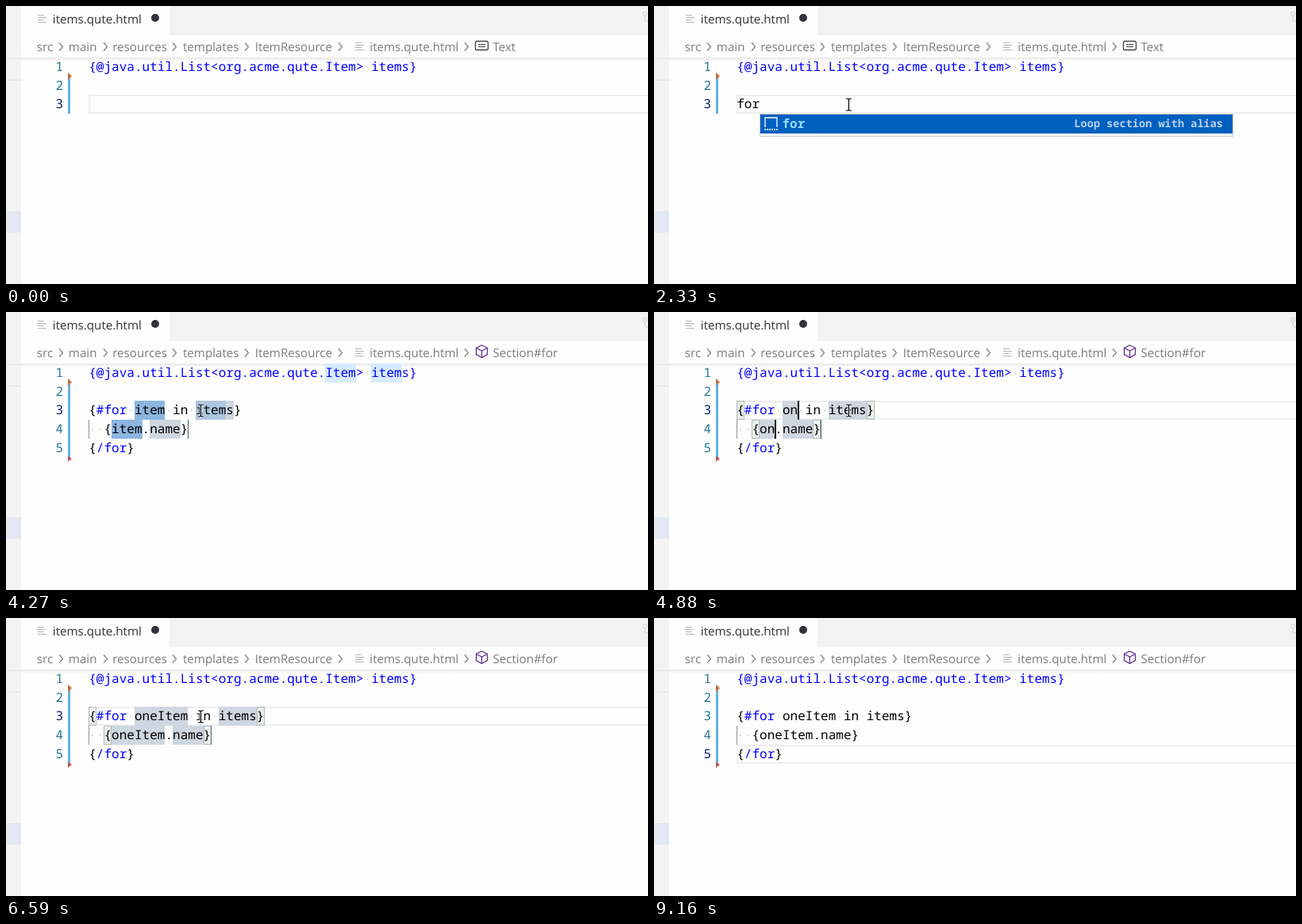
Animation of 809 by 351 pixels, one loop 9240 ms. Source, as an HTML page with a canvas:

```html
<!DOCTYPE html>
<html lang="en">
<head>
<meta charset="utf-8">
<title>Template editor</title>
<style>
  html, body { margin: 0; width: 100%; height: 100%; overflow: hidden; background: #fefefe; }
  canvas { display: block; width: 809px; height: 351px; }
</style>
</head>
<body>
<canvas id="stage" width="809" height="351"></canvas>
<script>
const ctx = document.getElementById('stage').getContext('2d');
const LOOP = 9240, W = 809, H = 351;
const MONO = '"Noto Sans Mono", "DejaVu Sans Mono", monospace';
const SANS = '"Open Sans", "Noto Sans", sans-serif';
const CODE_FONT = '16.03px ' + MONO, UI_FONT = '15.15px ' + SANS;
const X0 = 104.2, CELL = 9.62, ROW = 23.75, TOP = 65.3;
const BLUE = '#0000ff', BLACK = '#000', GREY = '#7c7c7c';
const ACCEPT = 2800, RENAME = 4650, CLICK = 7600;

// Times at which each character appears.
const typed = { word: [1550, 1700, 1780], name: [RENAME, 4880, 4960, 5340, 5590, 5740, 6120] };

// Times at which the caret flips, starting hidden.
const blink = [770, 1330, 1550, 2330, ACCEPT, 3260, 3730, 4270, RENAME, 6590, 7060, 7140, CLICK, 8150, 8625, 9080];

// Pointer moves: start, end, steps, target x, target y.
const moves = [
  [160, 770, 9, 243, 124],
  [930, 930, 1, 245, 125],
  [6980, 7210, 4, 252, 93],
  [7290, 7600, 5, 276, 205],
  [8150, 8300, 3, 512, 283],
  [8550, 8700, 3, 747, 361]
];

const count = (times, t) => times.filter(v => t >= v).length;
const colX = col => X0 + col * CELL;
const rowY = row => Math.floor(TOP + (row - 1) * ROW);

function rect(x, y, w, h, color) {
  ctx.fillStyle = color;
  ctx.fillRect(x, y, w, h);
}

function text(str, x, y, font, color, align = 'left') {
  ctx.font = font;
  ctx.fillStyle = color;
  ctx.textAlign = align;
  ctx.fillText(str, x, y);
}

function path(points, color, width = 1, close = false) {
  ctx.beginPath();
  points.forEach(([x, y]) => ctx.lineTo(x, y));
  if (close) ctx.closePath();
  ctx.strokeStyle = color;
  ctx.lineWidth = width;
  ctx.stroke();
}

function shape(points, color) {
  ctx.beginPath();
  points.forEach(([x, y]) => ctx.lineTo(x, y));
  ctx.fillStyle = color;
  ctx.fill();
}

// Draws one run of code on the character grid and returns the next column.
function code(str, row, col, color) {
  const y = rowY(row);
  [...str].forEach((ch, i) => {
    const x = colX(col + i);
    if (ch === ' ') rect(x + 4, y + 11.5, 1.7, 1.7, 'rgba(51,51,51,.24)');
    else text(ch, x, y + 17, CODE_FONT, color);
  });
  return col + str.length;
}

// Draws a section tag with dark braces around its blue keyword.
function tag(keyword, rest, row) {
  let col = code('{', row, 0, BLACK);
  col = code(keyword, row, col, BLUE);
  code(rest + '}', row, col, BLACK);
}

function mark(row, col, len, color) {
  const x = Math.round(colX(col)), y = rowY(row);
  rect(x, y, Math.round(colX(col + len)) - x, rowY(row + 1) - y, color);
}

function bracket(row, col) {
  const x = Math.round(colX(col)), y = rowY(row);
  rect(x, y, 10, 24, 'rgba(0,100,0,.08)');
  ctx.strokeStyle = '#b9b9b9';
  ctx.lineWidth = 1;
  ctx.strokeRect(x + .5, y + .5, 9, 23);
}

function lineBox(row) {
  ctx.strokeStyle = '#eeeeee';
  ctx.lineWidth = 2;
  ctx.strokeRect(105, rowY(row) + 1, W, 22);
}

function caret(row, col) {
  rect(Math.round(colX(col)), rowY(row), 2, 24, BLACK);
}

function fileIcon(x, y) {
  [8, 11, 8, 11].forEach((w, i) => rect(x, y + i * 3, w, 1, '#b4b4b4'));
}

function chrome(t) {
  rect(0, 0, W, H, '#fefefe');
  rect(0, 0, 19, H, '#f3f3f3');
  rect(206, 0, W - 206, 37, '#f3f3f3');
  rect(0, 66, 19, 1, '#e2e2e2');
  rect(0, 93, 19, 1, '#e2e2e2');
  rect(0, 259, 19, 27, '#e3e7f1');

  const shade = ctx.createLinearGradient(0, 65, 0, 70);
  shade.addColorStop(0, 'rgba(0,0,0,.09)');
  shade.addColorStop(1, 'rgba(0,0,0,0)');
  rect(19, 65, W - 19, 5, shade);

  fileIcon(40, 11);
  text('items.qute.html', 58.8, 22, UI_FONT, '#333');
  ctx.beginPath();
  ctx.arc(188, 15, 5, 0, 7);
  ctx.fillStyle = '#33333d';
  ctx.fill();

  ctx.beginPath();
  ctx.arc(805, 10, 2.5, 0, 7);
  ctx.strokeStyle = '#d2d2d2';
  ctx.lineWidth = 1;
  ctx.stroke();
  path([[805, 13], [805, 19], [809, 19]], '#d2d2d2');

  const inSection = t >= 3110;
  const crumbs = [['src', 38.8], ['main', 78.8], ['resources', 134.2], ['templates', 223],
    ['ItemResource', 313.8], ['items.qute.html', 458.3], [inSection ? 'Section#for' : 'Text', 613.4]];
  crumbs.forEach(([label, x]) => text(label, x, 57, UI_FONT, GREY));
  [67, 123, 210, 301, 419, 578].forEach(x =>
    path([[x, 46.5], [x + 4.5, 51.5], [x, 56.5]], GREY, 1.2));
  fileIcon(440, 46);

  if (inSection) {
    path([[599.5, 42], [606.5, 45.5], [606.5, 53.5], [599.5, 57.5], [592.5, 53.5], [592.5, 45.5]], '#652d90', 1.3, true);
    path([[592.5, 45.5], [599.5, 49], [606.5, 45.5]], '#652d90', 1.3);
    path([[599.5, 49], [599.5, 57.5]], '#652d90', 1.3);
  } else {
    ctx.beginPath();
    ctx.roundRect(591.5, 44.5, 16, 11, 2);
    ctx.strokeStyle = '#424242';
    ctx.lineWidth = 1.3;
    ctx.stroke();
    rect(595, 48, 9, 1, '#424242');
    rect(595, 51, 9, 1, '#424242');
  }
}

function gutter(t) {
  const lines = t < ACCEPT ? 3 : 5;
  const active = t < CLICK ? 3 : 5;
  for (let n = 1; n <= lines; n++)
    text(n, 72, rowY(n) + 17, CODE_FONT, n === active ? '#0b216f' : '#237893', 'right');
  const grown = t >= 2950;
  rect(78, 89, 3, (grown ? 184 : 136) - 89, '#66afe0');
  shape([[78, 84], [83, 88.5], [78, 93]], '#c4703f');
  if (grown) shape([[78, 182], [83, 185], [78, 189]], '#ca4b51');
}

function popup(n) {
  const x = Math.round(colX(n)), y = 136;
  rect(x, y, 597, 29, '#c8c8c8');
  rect(x + 1, y + 1, 595, 27, '#fefefe');
  rect(x + 1, y + 1, 595, 24, '#0060c0');
  path([[x + 7, y + 17], [x + 7, y + 5], [x + 22, y + 5], [x + 22, y + 17]], '#fff', 1.3);
  for (let i = 0; i < 6; i++) rect(x + 6.4 + i * 2.9, y + 19, 1.8, 1.8, '#fff');
  [...'for'].forEach((ch, i) =>
    text(ch, x + 28.5 + i * CELL, y + 18, (i < n ? 'bold ' : '') + CODE_FONT, i < n ? '#97ddff' : '#fff'));
  text('Loop section with alias', x + 584, y + 17, '600 13.6px ' + MONO, '#b5d0ec', 'right');
}

function draft(t, caretOn) {
  const n = count(typed.word, t);
  lineBox(3);
  code('for'.slice(0, n), 3, 0, BLACK);
  if (caretOn) caret(3, n);
  if (n) popup(n);
}

function section(t, caretOn) {
  const n = count(typed.name, t);
  const name = n ? 'oneItem'.slice(0, n) : 'item';
  const len = name.length;
  const head = `{#for ${name} in items}`, body = `  {${name}.name}`;
  const editing = t < CLICK;

  if (editing) {
    if (n) {
      lineBox(3);
    } else {
      mark(1, 31, 4, '#d6ebff');
      mark(1, 37, 4, '#d6ebff');
    }
    const field = '#ced6e0', current = n ? field : '#8cb5e0';
    mark(3, 6, len, current);
    mark(4, 3, len, current);
    mark(3, 10 + len, 5, field);
    if (!n) mark(3, 10 + len, 4, '#adc6e0');
    mark(4, 4 + len, 4, field);
    if (n) [[3, 0], [3, head.length - 1], [4, 2], [4, body.length - 1]].forEach(b => bracket(...b));
    rect(Math.round(colX(body.length)), 136, 1, 24, '#4a5a70');
  } else {
    lineBox(5);
    if (t < 9160) [0, 5].forEach(col => bracket(5, col));
  }

  rect(104, 136, 1, 24, '#939393');
  tag('#for', ` ${name} in items`, 3);
  code(body, 4, 0, BLACK);
  tag('/for', '', 5);

  if (!caretOn) return;
  if (editing) {
    caret(3, 6 + len);
    caret(4, 3 + len);
  } else {
    caret(5, 6);
  }
}

function pointer(t) {
  if (t < 160 || t >= 8700) return;
  let x = 466, y = 257;
  for (const [start, end, steps, tx, ty] of moves) {
    if (t < start) break;
    const gap = steps > 1 ? (end - start) / (steps - 1) : 1;
    const p = Math.min(steps, Math.floor((t - start) / gap + .001) + 1) / steps;
    const e = p * p * (3 - 2 * p);
    x += (tx - x) * e;
    y += (ty - y) * e;
  }
  x = Math.round(x) + .5;
  y = Math.round(y) - .5;
  const beam = (color, w) => {
    path([[x, y - 7], [x, y + 7]], color, w);
    for (const s of [-1, 1])
      path([[x - 3.5, y + 7.5 * s], [x - 1, y + 7.5 * s], [x, y + 6.5 * s], [x + 1, y + 7.5 * s], [x + 3.5, y + 7.5 * s]], color, w);
  };
  beam('rgba(255,255,255,.8)', 3);
  beam(BLACK, 1.2);
}

function draw(t) {
  ctx.textRendering = 'geometricPrecision';
  const caretOn = count(blink, t) % 2 === 1;
  chrome(t);
  gutter(t);
  (t < ACCEPT ? draft : section)(t, caretOn);
  code('{@java.util.List<org.acme.qute.Item> items}', 1, 0, BLUE);
  pointer(t);
}

const begin = performance.now();
function tick() {
  draw((performance.now() - begin) % LOOP);
  requestAnimationFrame(tick);
}
tick();
</script>
</body>
</html>
```
